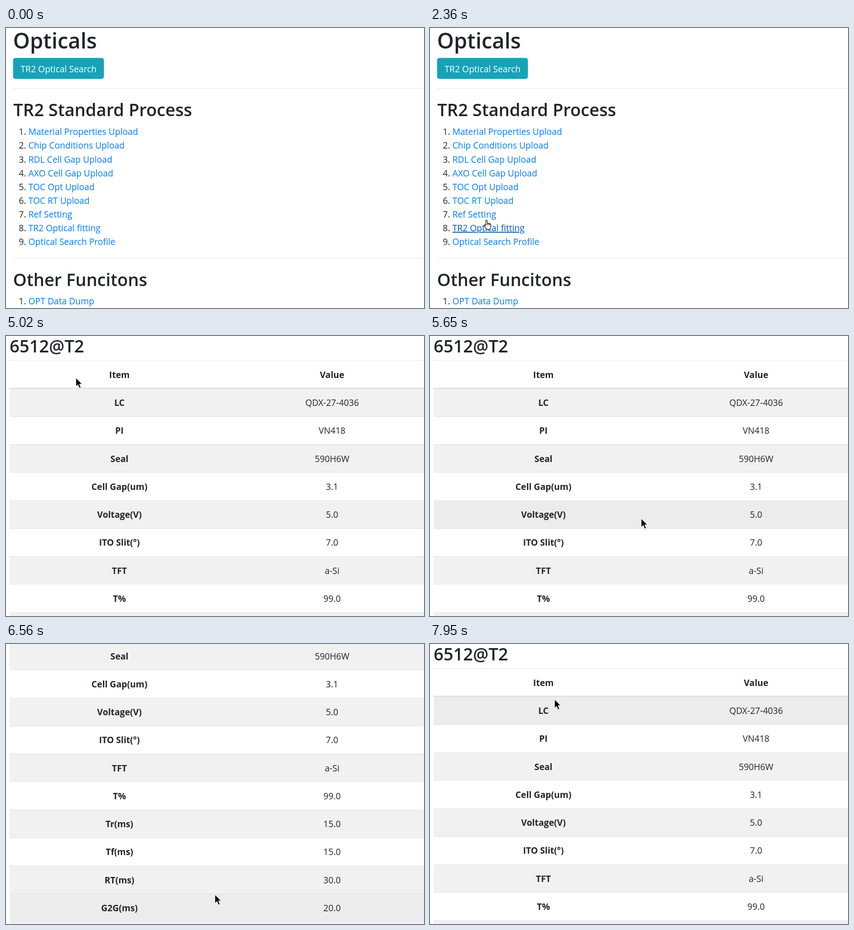
These frames come from a looping animation (914 px wide and 613 px high, 8000 ms). An HTML page:

```html
<!DOCTYPE html>
<html lang="en">
<head>
<meta charset="utf-8">
<title>Optical reference browsing</title>
<style>
  html, body { margin: 0; width: 100%; height: 100%; overflow: hidden; background: #fff; }
  svg { display: block; width: 914px; height: 613px; font: 19.1px "Open Sans", "Noto Sans", sans-serif; }
  text { fill: #212529; white-space: pre; }
  .h1 { font-size: 46.7px; font-weight: 600; }
  .h2 { font-size: 37.7px; font-weight: 600; }
  .th { font-size: 19.2px; font-weight: 700; }
  .mid { text-anchor: middle; }
  .end { text-anchor: end; }
  .white { fill: #fff; }
  .link { fill: #007bff; }
  .link.hover { fill: #0056b3; text-decoration: underline 1.3px; text-underline-offset: 3px; }
  .rule { fill: #e5e5e5; }
  .border { fill: #dee2e6; }
  .row { fill: #fff; }
  .row.odd { fill: #f1f1f1; }
  .row.hover { fill: #ececec; }

  /* Page visits: home until 2960 ms, list until 4740 ms, then detail. */
  .page { visibility: hidden; }
</style>
</head>
<body>
<svg viewBox="0 0 914 613">
  <g id="home" class="page"></g>
  <g id="list" class="page"></g>
  <g id="detail" class="page"></g>
  <g id="cursor" stroke-linejoin="round">
    <path id="arrow" d="M0 0V18.5L4.3 14.4L7.6 22L10.6 20.7L7.4 13.3H13Z" fill="#000" stroke="#fff" stroke-width=".8"/>
    <g id="hand" stroke="#000" stroke-width="1.2">
      <path d="M-1.6 12V1.6Q-1.5 0 0 0T1.7 1.6V7Q3.2 5.8 4.6 7.3Q6.2 6.3 7.2 8Q9.6 7.4 9.6 10V14Q9.4 16.5 8 18V20.5H-.4V18.5Q-3 15.5-5.2 11.8Q-5.4 9.6-3.4 10Z" fill="#fff"/>
      <path d="M1.7 7V11M4.6 7.3V11M7.2 8V11" fill="none"/>
    </g>
  </g>
</svg>
<script>
const LOOP = 8000, FRAME = 69.7, ENTER = 460;
const SCROLL = 242, ROW_TOP = 115.2, ROW_H = 61.25;
const $ = id => document.getElementById(id);

function add(parent, tag, attrs, content = '') {
  const el = document.createElementNS('http://www.w3.org/2000/svg', tag);
  for (const key in attrs) el.setAttribute(key, attrs[key]);
  el.textContent = content;
  parent.appendChild(el);
  return el;
}
const label = (parent, x, y, content, cls = '') => add(parent, 'text', { x, y, class: cls }, content);
const box = (parent, x, y, width, height, cls) => add(parent, 'rect', { x, y, width, height, class: cls });

const hotAreas = [];
function link(page, x, y, content) {
  const el = label($(page), x, y, content, 'link');
  hotAreas.push({ page, el, x0: x, x1: x + el.getComputedTextLength(), y0: y - 21, y1: y + 9 });
}

function numberedLinks(page, firstY, names) {
  names.forEach((name, i) => {
    const y = firstY + 30.15 * i;
    label($(page), 44, y, `${i + 1}.`, 'end');
    link(page, 49, y, name);
  });
}

function buildHome() {
  const home = $('home');
  label(home, 15.5, 45, 'Opticals', 'h1');
  add(home, 'rect', { x: 15.5, y: 65.5, width: 198.5, height: 46, rx: 5, fill: '#17a2b8' });
  label(home, 115, 96.5, 'TR2 Optical Search', 'mid white');
  box(home, 16, 132, 898, 1, 'rule');
  label(home, 16, 193, 'TR2 Standard Process', 'h2');
  numberedLinks('home', 234.2, ['Material Properties Upload', 'Chip Conditions Upload',
    'RDL Cell Gap Upload', 'AXO Cell Gap Upload', 'TOC Opt Upload', 'TOC RT Upload',
    'Ref Setting', 'TR2 Optical fitting', 'Optical Search Profile']);
  box(home, 16, 503, 898, 1, 'rule');
  label(home, 15.5, 565, 'Other Funcitons', 'h2');
  numberedLinks('home', 605.3, ['OPT Data Dump']);
}

function buildList() {
  label($('list'), 16, 36, 'Optical Reference List', 'h2');
  link('list', 16, 75, '6512@T2');
}

function buildDetail() {
  const detail = $('detail');
  const cells = (y, item, value, valueClass) => {
    label(detail, 248, y, item, 'th mid');
    label(detail, 713, y, value, valueClass);
  };
  label(detail, 8, 35.5, '6512@T2', 'h2');
  box(detail, 8, 53, 906, 1, 'border');
  cells(92, 'Item', 'Value', 'th mid');
  const rows = ['LC: QDX-27-4036', 'PI: VN418', 'Seal: 590H6W', 'Cell Gap(um): 3.1',
    'Voltage(V): 5.0', 'ITO Slit(°): 7.0', 'TFT: a-Si', 'T%: 99.0', 'Tr(ms): 15.0',
    'Tf(ms): 15.0', 'RT(ms): 30.0', 'G2G(ms): 20.0', ': '];
  rows.forEach((row, i) => {
    const top = ROW_TOP + ROW_H * i, y = Math.round(top - .5);
    const el = box(detail, 8, y, 906, 62, i % 2 ? 'row' : 'row odd');
    box(detail, 8, y, 906, 1, 'border');
    cells(top + 38, ...row.split(': '), 'mid');
    hotAreas.push({ page: 'detail', el, x0: 8, x1: 914, y0: top, y1: top + ROW_H });
  });
  box(detail, 8, 113, 906, 2, 'border');
}

function ease(t, start, end) {
  const k = Math.min(1, Math.max(0, (t - start) / (end - start)));
  return k * k * (3 - 2 * k);
}

// The pointer rests between moves.
const entry = { x: 495, y: 600 };
const moves = [
  { start: 460, end: 1560, x: 141, y: 439 },
  { start: 2090, end: 2360, x: 121, y: 418 },
  { start: 3290, end: 4200, x: 75, y: 62 },
  { start: 4740, end: 5018, x: 153, y: 92 },
  { start: 5018, end: 5650, x: 462, y: 400 },
  { start: 5900, end: 6320, x: 457, y: 549 },
  { start: 6560, end: 7180, x: 419, y: 144 },
  { start: 7400, end: 7940, x: 272.5, y: 121.5 }
];

function pointerAt(t) {
  let { x, y } = entry;
  for (const move of moves) {
    const k = ease(t, move.start, move.end);
    x += (move.x - x) * k;
    y += (move.y - y) * k;
  }
  return { x, y };
}

function stateAt(time) {
  const t = Math.floor(time / FRAME) * FRAME;
  return {
    ...pointerAt(t),
    visible: time >= ENTER,
    page: time < 2960 ? 'home' : time < 4740 ? 'list' : 'detail',
    scroll: Math.round(SCROLL * (ease(t, 5650, 6000) - ease(t, 7230, 7600)))
  };
}

function render(time) {
  const now = stateAt(time), before = stateAt(time - FRAME);
  for (const page of document.querySelectorAll('.page')) {
    page.style.visibility = page.id === now.page ? 'visible' : 'hidden';
  }
  $('detail').setAttribute('transform', `translate(0 ${-now.scroll})`);

  // Hover feedback trails the pointer by one update.
  let onLink = false;
  const hoverY = before.y + before.scroll;
  for (const { page, el, x0, x1, y0, y1 } of hotAreas) {
    const hit = before.visible && page === now.page && page === before.page &&
      before.x >= x0 && before.x < x1 && hoverY >= y0 && hoverY < y1;
    el.classList.toggle('hover', hit);
    onLink ||= hit && page !== 'detail';
  }
  $('cursor').setAttribute('transform', `translate(${now.x} ${now.y})`);
  $('cursor').style.display = now.visible ? '' : 'none';
  $('arrow').style.display = onLink ? 'none' : '';
  $('hand').style.display = onLink ? '' : 'none';
}

buildHome();
buildList();
buildDetail();
const origin = performance.now();
function tick() {
  render((performance.now() - origin) % LOOP);
  requestAnimationFrame(tick);
}
tick();
</script>
</body>
</html>
```
